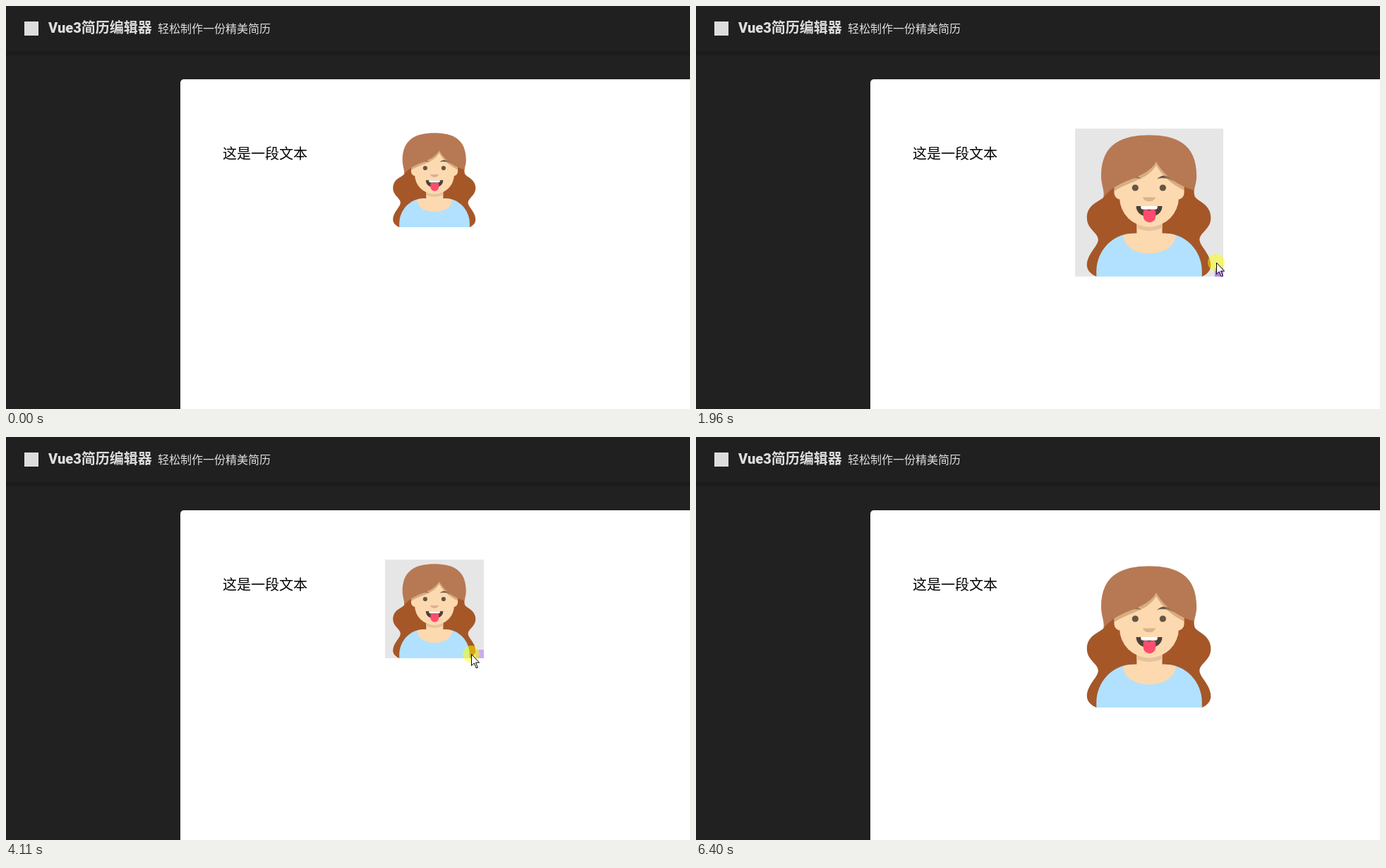
An HTML page that plays this animation: 969 px wide and 572 px high, repeating every 6780 ms.

```html
<!DOCTYPE html>
<html lang="zh-CN">
<head>
<meta charset="utf-8">
<title>Vue3简历编辑器</title>
<style>
  html, body { margin: 0; width: 100%; height: 100%; overflow: hidden; background: #212121; }
  svg { display: block; }
  text { font-family: Roboto, "Noto Sans CJK SC", "Noto Sans CJK", sans-serif; fill: #ddd; }
  .name { font-size: 20px; font-weight: 700; }
  .name tspan { font-weight: 900; }
  .tagline { font-size: 16px; }
  .sample { font-family: "Noto Sans CJK SC", "Noto Sans CJK", sans-serif; font-size: 20px; font-weight: 300; fill: #000; }
</style>
</head>
<body>
<svg width="969" height="572" viewBox="0 0 969 572">
  <defs>
    <path id="fringe" d="M48 116C50 105 44 95 44 80C44 25 80 11 125 11C170 11 205 25 205 80C205 90 202 97 201 104C185 101 152 85 137 56C118 88 75 82 48 116Z"/>
    <path id="head" d="M75 50H175V116A50 50 0 0 1 75 116Z"/>
    <path id="brow" d="M138 85Q152 72 167 89Q152 81 138 85Z"/>
    <clipPath id="neckClip"><path d="M104 120H147V178H104Z"/></clipPath>
    <clipPath id="faceClip"><path d="M66 50H184V120H66Z"/></clipPath>
  </defs>

  <rect width="969" height="572" fill="#212121"/>
  <rect width="969" height="64" fill="#202020"/>
  <rect y="64" width="969" height="6" fill="#1c1c1c"/>
  <rect x="26" y="22" width="20" height="20" fill="#ddd"/>
  <text class="name" x="60" y="38"><tspan>Vue3</tspan>简历编辑器</text>
  <text class="tagline" x="215" y="38">轻松制作一份精美简历</text>
  <rect x="247" y="104" width="740" height="500" rx="5" fill="#fff"/>
  <text class="sample" x="307" y="217">这是一段文本</text>

  <g transform="translate(537 174)">
    <rect id="backdrop" fill="#e6e6e6"/>
    <g id="avatar">
      <path fill="#a55728" d="M50 80V100Q50 112 48 116C40 124 20 128 20 151C20 170 39 176 39 188C39 198 20 212 20 231C20 240 28 247 36 250H214C222 247 229 240 229 231C229 212 210 198 210 188C210 176 229 170 229 151C229 128 208 124 202 115Q200 110 201 100V80Z"/>
      <path fill="#b1e1ff" d="M36 250V241C36 206 64 177 98 177H152C186 177 214 206 214 241V250Z"/>
      <path fill="#fdd9b0" d="M104 140H147V177H152Q161 177 170 180C169 200 148 211 125 211C102 211 82 200 81 180Q90 177 104 177Z"/>
      <g clip-path="url(#neckClip)"><use href="#head" y="7" fill="#e4c39e"/></g>
      <rect x="66" y="70" width="118" height="50" rx="11" fill="#fdd9b0"/>
      <use href="#head" fill="#fdd9b0"/>
      <g fill="#665543">
        <use href="#brow"/>
        <use href="#brow" transform="matrix(-1 0 0 1 250 0)"/>
        <circle cx="101.5" cy="100" r="5.5"/>
        <circle cx="148" cy="100" r="5.5"/>
      </g>
      <g clip-path="url(#faceClip)"><use href="#fringe" y="6" fill="#b88a60" fill-opacity=".55"/></g>
      <use href="#fringe" fill="#b77953"/>
      <path fill="#d9b38c" d="M114 116H136Q133 123 125 123T114 116Z"/>
      <path fill="#4b4137" d="M103 131H147C147 142 138 149 125 149S103 142 103 131Z"/>
      <path fill="#fff" d="M111 131H139V133Q139 136.500 135 136.500H115Q111 136.500 111 133Z"/>
      <path fill="#ff4c6c" d="M115 141Q115 137 119 137Q123 137 125 139Q127 137 131 137Q136 137 136 141V148A10.500 10.500 0 0 1 115 148Z"/>
    </g>
    <g id="handles"></g>
  </g>

  <g id="pointer">
    <circle id="press" r="12" fill="#ff0" fill-opacity=".5"/>
    <path d="M.5.5V16.500L4.200 13L7.200 20L9.300 19.200L6.400 12.200H11.500Z" fill="#fff" stroke="#000"/>
  </g>
</svg>

<script>
const LOOP = 6780, LEFT = 537, TOP = 174, GRIP = 12, GRAB_X = 664;

// Each stroke: number of picture steps, then [time, x, y] points along the pointer path.
const strokes = [
  [9, [150, 878, 556], [390, 752, 415], [610, 670, 325], [770, 647, 299]],
  [4, [850, 651, 300], [1090, 664, 302]],
  [9, [1400, 668, 304], [1960, 737, 364], [2040, 746, 375]],
  [7, [2120, 755, 386], [2600, 785, 417]],
  [9, [2910, 775, 409], [3550, 717, 364]],
  [9, [3710, 712, 360], [4110, 659, 308], [4350, 650, 299]],
  [7, [4430, 658, 310], [4910, 755, 411]],
  [4, [5290, 752, 405], [5530, 735, 374]],
  [9, [5690, 745, 382], [6000, 835, 470], [6320, 938, 568]]
];

const byId = id => document.getElementById(id);
const show = (el, on) => el.setAttribute("visibility", on ? "visible" : "hidden");
const setAll = (el, attrs) => Object.entries(attrs).forEach(([k, v]) => el.setAttribute(k, v));

const grips = Array.from({ length: 4 }, () => {
  const grip = document.createElementNS("http://www.w3.org/2000/svg", "rect");
  setAll(grip, { width: GRIP, height: GRIP });
  return byId("handles").appendChild(grip);
});

function pointerAt(time) {
  const stroke = strokes.findLast(s => s[1][0] <= time) || strokes[0];
  const [steps, ...points] = stroke;
  const start = points[0][0], end = points.at(-1)[0];
  const gap = (end - start) / (steps - 1);
  const held = Math.min(end, start + Math.floor((time - start) / gap + 1e-6) * gap);
  let i = 1;
  while (i < points.length - 1 && points[i][0] < held) i++;
  const [t0, x0, y0] = points[i - 1], [t1, x1, y1] = points[i];
  const p = Math.max(0, (held - t0) / (t1 - t0));
  return [Math.round(x0 + (x1 - x0) * p), Math.round(y0 + (y1 - y0) * p)];
}

function sizeAt(time, x) {
  if (time < 1400) return 140;
  if (time >= 5690) return 210;
  return 140 + Math.round((x - GRAB_X) / 10) * 10;
}

function draw(time) {
  const [x, y] = pointerAt(time);
  const visible = time >= 150 && time < 6400;
  const size = sizeAt(time, x);
  const hover = visible && x >= LEFT && x < LEFT + size && y >= TOP && y <= TOP + size;
  const far = size - GRIP, middle = far / 2;

  setAll(byId("backdrop"), { width: size, height: size });
  show(byId("backdrop"), hover);
  byId("avatar").setAttribute("transform", `scale(${size / 250})`);

  const places = [[far, far], [0, far], [0, middle], [far, middle]];
  const strong = time >= 1090 && time < 2910;
  grips.forEach((grip, i) => {
    setAll(grip, {
      x: places[i][0], y: places[i][1],
      fill: i === 0 && strong ? "#b57df0" : "#cbacf0"
    });
    show(grip, hover && (i === 0 || time < 1010));
  });

  byId("pointer").setAttribute("transform", `translate(${x} ${y})`);
  byId("pointer").style.display = visible ? "" : "none";
  show(byId("press"), time >= 1400 && time < 5690);
}

const began = performance.now();
function tick() {
  draw((performance.now() - began) % LOOP);
  requestAnimationFrame(tick);
}
draw(0);
requestAnimationFrame(tick);
</script>
</body>
</html>
```
